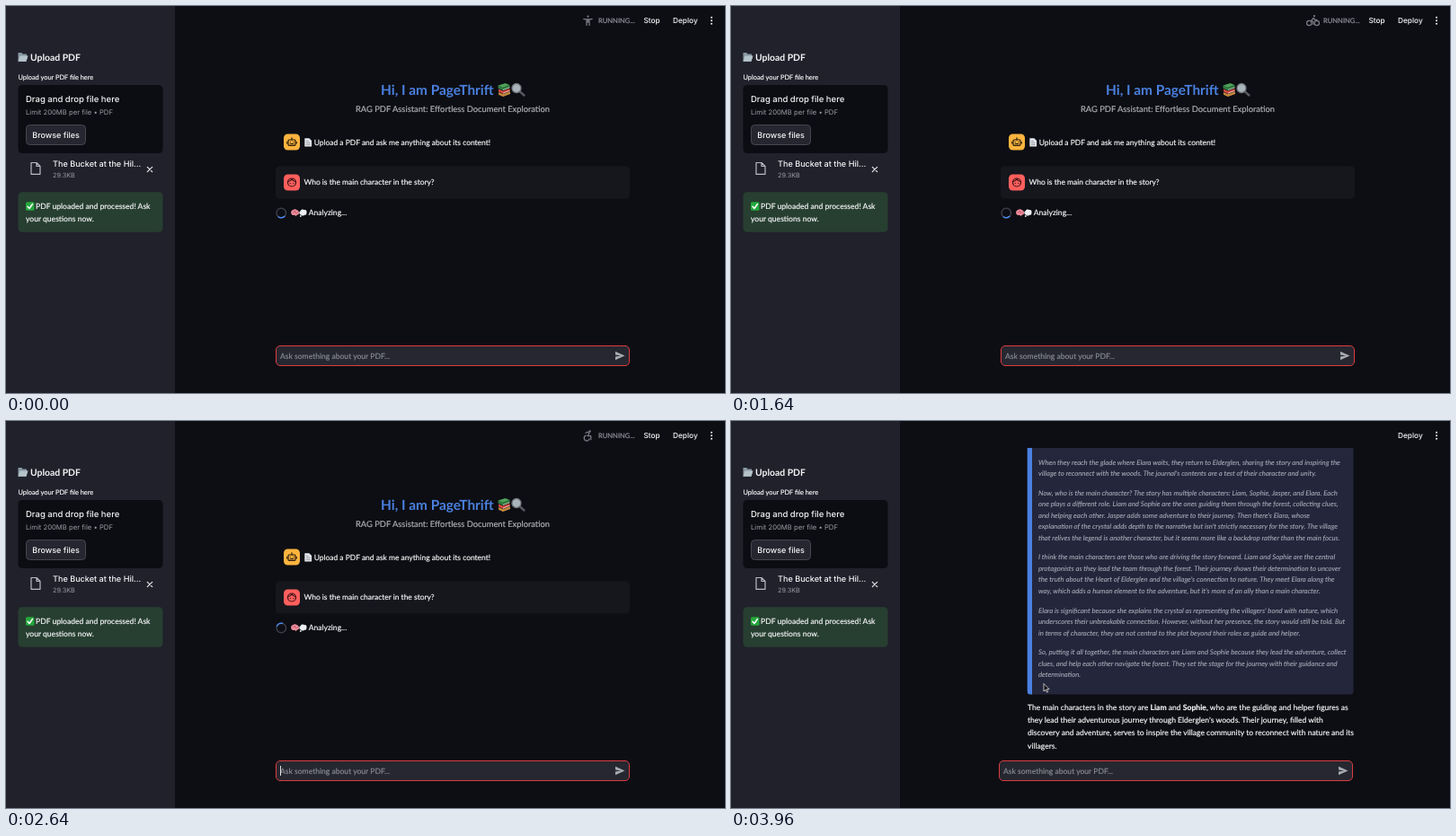
Animation of 800 by 431 pixels, one loop 4 s. Source, as an HTML page:

```html
<!DOCTYPE html>
<html lang="en">
<head>
<meta charset="utf-8">
<title>PDF assistant</title>
<style>
  html, body { margin: 0; width: 100%; height: 100%; overflow: hidden; background: #0d0e13; }
  svg { display: block; width: 100vw; height: 100vh; }
  text {
    font-family: Lato, sans-serif; font-size: 8.57px; white-space: pre; text-rendering: geometricPrecision;
    color: #f6f6f8; fill: currentColor; stroke: currentColor; stroke-width: .18px;
  }
  .chat { font-size: 8.45px; }
  .ui { font-family: Inter, sans-serif; font-size: 9.1px; font-weight: 500; stroke: none; }
  .dim { color: #9b9ca4; font-weight: 400; }
  .thought { font-size: 7.75px; font-style: italic; color: #a9abb9; stroke-width: .08px; }
  .line { fill: none; stroke: #7d7f88; stroke-width: 1.2; stroke-linecap: round; stroke-linejoin: round; }
  .hidden { visibility: hidden; }
</style>
</head>
<body>
<svg viewBox="0 0 800 431" preserveAspectRatio="none">
  <defs>
    <clipPath id="page"><rect x="188" y="30" width="612" height="340"/></clipPath>
  </defs>
  <rect width="800" height="431" fill="#0d0e13"/>

  <g id="sidebar">
    <rect width="188" height="431" fill="#20212b"/>
    <path d="M13.5 52h4l1 1.5h4.5v2h1.3l-1.8 6.2h-9z" fill="#8798a2"/>
    <path d="M15.5 55.5h9l-2 6.2h-9z" fill="#b5c3ca"/>
    <text x="27" y="60.6" style="font-size:10.4px;font-weight:700;stroke:none">Upload PDF</text>
    <text x="13.5" y="81.8" style="font-size:7.42px">Upload your PDF file here</text>
    <rect x="13.5" y="88" width="161" height="76" rx="4.5" fill="#0c0d12"/>
    <text class="ui" x="22" y="107.2" style="font-size:9.5px">Drag and drop file here</text>
    <text class="ui dim" x="22" y="120.8" style="font-size:7.7px">Limit 200MB per file • PDF</text>
    <rect x="22.5" y="132.5" width="66" height="22" rx="4" fill="#25262f" stroke="#46474f"/>
    <text class="ui" x="29.3" y="146.7" style="font-size:9px">Browse files</text>
    <path class="line" d="M28 174.5h6l4 4v8.8h-10zM34 174.5v4h4" style="stroke:#b9bac2"/>
    <text class="ui" x="52" y="179" style="font-size:9.1px">The Bucket at the Hil...</text>
    <text class="ui dim" x="52" y="191.2" style="font-size:7.3px">29.3KB</text>
    <path class="line" d="M157.3 179.3l5.4 5.4m0-5.4l-5.4 5.4" style="stroke:#e8e8ec"/>
    <rect x="13.5" y="207.2" width="161" height="44.6" rx="4.5" fill="#273f31"/>
    <rect x="22" y="218.3" width="9.5" height="9.5" rx="1.5" fill="#25a83c"/>
    <path class="line" d="M24 223.2l2 2.3 3.5-5" style="stroke:#fff;stroke-width:1.5"/>
    <text x="33" y="226">PDF uploaded and processed! Ask</text>
    <text x="22" y="239.9">your questions now.</text>
  </g>

  <g id="waiting">
    <g id="poses" class="line">
      <g>
        <circle cx="647.5" cy="11.7" r="1.1" fill="#7d7f88" stroke="none"/>
        <path d="M642.8 14.3q4.7 1.2 9.4 0M646 15v6.5M649 15v6.5M646 17.8h3M647.5 15v3"/>
      </g>
      <g>
        <circle cx="649.3" cy="11.5" r="1.2" fill="#7d7f88" stroke="none"/>
        <path d="M643.5 16.5v-2l3.2-1.3 1.8.3 1.2 2 2.3 1M647.5 13.8l-.7 3.7 2.1 1.8v2.7M646.8 17.5l-.9 2.2-3.4-.5"/>
      </g>
      <g>
        <circle cx="643.3" cy="19" r="2.7"/><circle cx="651.8" cy="19" r="2.7"/>
        <circle cx="649" cy="11.2" r="1.1" fill="#7d7f88" stroke="none"/>
        <path d="M647.8 20.5v-2.7l-2-1.8 2.4-2.5 1.7 1.8h2"/>
      </g>
      <g>
        <circle cx="649.5" cy="11.5" r="1.2" fill="#7d7f88" stroke="none"/>
        <path d="M645 13.3l2-1 2 1-1.8 3.4h3.6v4M645.5 16.2a3 3 0 1 0 3.6 3.7"/>
      </g>
    </g>
    <text x="659" y="18.8" style="font-size:7.6px;color:#91939b">RUNNING...</text>
    <text class="ui" x="709.5" y="19" style="font-size:8.3px">Stop</text>

    <text x="417" y="99" style="font-size:15.4px;font-weight:700;color:#4a80e0;stroke:none">Hi, I am PageThrift</text>
    <g stroke-linejoin="round">
      <path d="M547.5 88.5l8-2.5 5 2-8 3z" fill="#4ea35a"/>
      <path d="M547.5 88.5v3l5 2.5 8-3v-3l-8 3z" fill="#2f7c40"/>
      <path d="M548 92.5l5 2.3 7.5-2.8v2.7l-7.5 3-5-2.4z" fill="#d94a43"/>
      <path d="M548 96l5 2.3 8-3v2.7l-8 3-5-2.3z" fill="#c58a3c"/>
      <path d="M553 93.5l7.5-2.8M553 97.2l7.5-2.8" stroke="#e8dfce" stroke-width=".8"/>
    </g>
    <path d="M572 95.5l4.5 4" stroke="#56585f" stroke-width="2.4" stroke-linecap="round"/>
    <circle cx="568" cy="91.5" r="5" fill="#a9b5bb" stroke="#73787f" stroke-width="1.3"/>
    <text x="389" y="117.8" style="font-size:9.33px;color:#b0b1b7">RAG PDF Assistant: Effortless Document Exploration</text>

    <rect x="309" y="142.5" width="18" height="18" rx="4.5" fill="#fdb43e"/>
    <g class="line" style="stroke:#241a0b">
      <rect x="314" y="149" width="8" height="6.3" rx="1"/>
      <path d="M318 149v-2.2M312.7 151.5v1.5M323.3 151.5v1.5M316.3 151.5h.1M319.7 151.5h.1M316.3 153.5h3.4"/>
    </g>
    <path d="M332.3 147.3h5l2.8 2.8v6.4h-7.8z" fill="#e3e6ea"/>
    <path d="M333.8 150.5h3M333.8 152.5h4.8M333.8 154.5h4.8" stroke="#7c8290" stroke-width=".7"/>
    <text class="chat" x="342.7" y="154.8">Upload a PDF and ask me anything about its content!</text>

    <rect x="300" y="178.5" width="394" height="36" rx="4.5" fill="#16171d"/>
    <rect x="309" y="187.5" width="18" height="18" rx="4.5" fill="#ff5f5d"/>
    <g class="line" style="stroke:#351013">
      <circle cx="318" cy="196.5" r="4.5"/>
      <path d="M313.8 195.5q3-.3 4.2-2.7 1.5 2.7 4.3 2.7M316.3 197.5h.1M319.7 197.5h.1"/>
    </g>
    <text class="chat" x="331.5" y="199.4">Who is the main character in the story?</text>

    <circle cx="306.3" cy="230.5" r="5.3" fill="none" stroke="#3b3d47" stroke-width="1.5"/>
    <path id="spinner" d="M302.55 226.75a5.3 5.3 0 0 1 7.5 0" fill="none" stroke="#4a8af0" stroke-width="1.5"/>
    <path d="M317.3 231q-.8-3 2-4 2.2-1.5 4.5.2 2.7 1 2.2 3.8-.5 2-2.5 1.8l-.8 1.5-1.5-1.5q-3.4.8-3.9-1.8z" fill="#ef8f9d"/>
    <path d="M319 230q1.5-1.5 3 0t3-1M321 227.5q0 1.5 1.5 1.7" fill="none" stroke="#b4485f" stroke-width=".7"/>
    <path d="M328 232.5a2.2 2.2 0 0 1-.3-4.2 2.5 2.5 0 0 1 4-1.3 2.3 2.3 0 0 1 2.7 3.2 2 2 0 0 1-2.4 2.5 2.5 2.5 0 0 1-4-.2z" fill="#eceef3"/>
    <circle cx="327.8" cy="234" r=".9" fill="#eceef3"/>
    <text x="336.7" y="233.2">Analyzing...</text>
  </g>

  <g id="answer" class="hidden" clip-path="url(#page)">
    <g id="scroll">
      <rect x="330" y="-60" width="362.5" height="347" rx="3.5" fill="#24273b"/>
      <path d="M335-60v347h-1.8a3.5 3.5 0 0 1-3.5-3.5v-343.5z" fill="#4a80e0"/>
      <g id="thoughts"></g>
      <text x="330" y="304">The main characters in the story are <tspan font-weight="700">Liam</tspan> and <tspan font-weight="700">Sophie</tspan>, who are the guiding and helper figures as</text>
      <text x="330" y="318.35">they lead their adventurous journey through Elderglen's woods. Their journey, filled with</text>
      <text x="330" y="332.7">discovery and adventure, serves to inspire the village community to reconnect with nature and its</text>
      <text x="330" y="347.05">villagers.</text>
    </g>
  </g>

  <text class="ui" x="742" y="19" style="font-size:8.3px">Deploy</text>
  <g fill="#f6f6f8"><circle cx="785" cy="12.7" r="1"/><circle cx="785" cy="16.2" r="1"/><circle cx="785" cy="19.7" r="1"/></g>

  <g id="prompt">
    <rect x="300.5" y="378.5" width="393" height="22" rx="4.5" fill="#262730" stroke="#dc3d41"/>
    <text x="305" y="392.6" style="color:#888a93">Ask something about your PDF...</text>
    <path d="M678 384.7l10.5 4.8-10.5 4.8v-3.8l6-1-6-1z" fill="#a9abb3"/>
    <rect id="caret" x="305" y="384" width=".9" height="11" fill="#f6f6f8"/>
  </g>
  <path id="pointer" class="hidden" d="M348 292.5v8.5l2-1.8 1.4 3 1.3-.6-1.4-2.9h2.8z" fill="#0b0b0d" stroke="#fff" stroke-width=".7"/>
</svg>

<script>
const LOOP = 4000;
const ANSWER_AT = 2720;
const POINTER_AT = 3600;
const SPIN = { period: 410, from: 176 };
const CARET = { period: 546, from: 202 };
const POSE_STARTS = [0, 360, 1180, 2100];
const SCROLL_STEPS = [[0, 0], [3920, 6], [3960, 17.5]];

const PARAGRAPHS = [
  ["When they reach the glade where Elara waits, they return to Elderglen, sharing the story and inspiring the",
   "village to reconnect with the woods. The journal's contents are a test of their character and unity."],
  ["Now, who is the main character? The story has multiple characters: Liam, Sophie, Jasper, and Elara. Each",
   "one plays a different role. Liam and Sophie are the ones guiding them through the forest, collecting clues,",
   "and helping each other. Jasper adds some adventure to their journey. Then there's Elara, whose",
   "explanation of the crystal adds depth to the narrative but isn't strictly necessary for the story. The village",
   "that relives the legend is another character, but it seems more like a backdrop rather than the main focus."],
  ["I think the main characters are those who are driving the story forward. Liam and Sophie are the central",
   "protagonists as they lead the team through the forest. Their journey shows their determination to uncover",
   "the truth about the Heart of Elderglen and the village's connection to nature. They meet Elara along the",
   "way, which adds a human element to the adventure, but it's more of an ally than a main character."],
  ["Elara is significant because she explains the crystal as representing the villagers' bond with nature, which",
   "underscores their unbreakable connection. However, without her presence, the story would still be told. But",
   "in terms of character, they are not central to the plot beyond their roles as guide and helper."],
  ["So, putting it all together, the main characters are Liam and Sophie because they lead the adventure, collect",
   "clues, and help each other navigate the forest. They set the stage for the journey with their guidance and",
   "determination."]
];

const $ = id => document.getElementById(id);
const show = (el, on) => { el.style.visibility = on ? "visible" : "hidden"; };
const lastStarted = (starts, t) => starts.filter(s => s <= t).length - 1;

let y = 31.1;
for (const lines of PARAGRAPHS) {
  for (const line of lines) {
    const text = document.createElementNS("http://www.w3.org/2000/svg", "text");
    text.setAttribute("class", "thought");
    text.setAttribute("x", 342);
    text.setAttribute("y", y);
    text.textContent = line;
    $("thoughts").append(text);
    y += 12.55;
  }
  y += 8.95;
}

const poses = [...$("poses").children];

function render(t) {
  const answered = t >= ANSWER_AT;
  show($("waiting"), !answered);
  show($("answer"), answered);
  show($("pointer"), t >= POINTER_AT);

  const blink = (t - CARET.from + CARET.period) % CARET.period;
  show($("caret"), blink < CARET.period / 2);

  const pose = lastStarted(POSE_STARTS, t);
  poses.forEach((el, i) => show(el, !answered && i === pose));

  const angle = SPIN.from + t / SPIN.period * 360;
  $("spinner").setAttribute("transform", `rotate(${angle} 306.3 230.5)`);
  $("prompt").setAttribute("transform", `translate(${answered ? -2 : 0})`);

  const scroll = SCROLL_STEPS[lastStarted(SCROLL_STEPS.map(s => s[0]), t)][1];
  $("scroll").setAttribute("transform", `translate(0 ${scroll})`);
}

const start = performance.now();
function tick() {
  render((performance.now() - start) % LOOP);
  requestAnimationFrame(tick);
}
tick();
</script>
</body>
</html>
```
